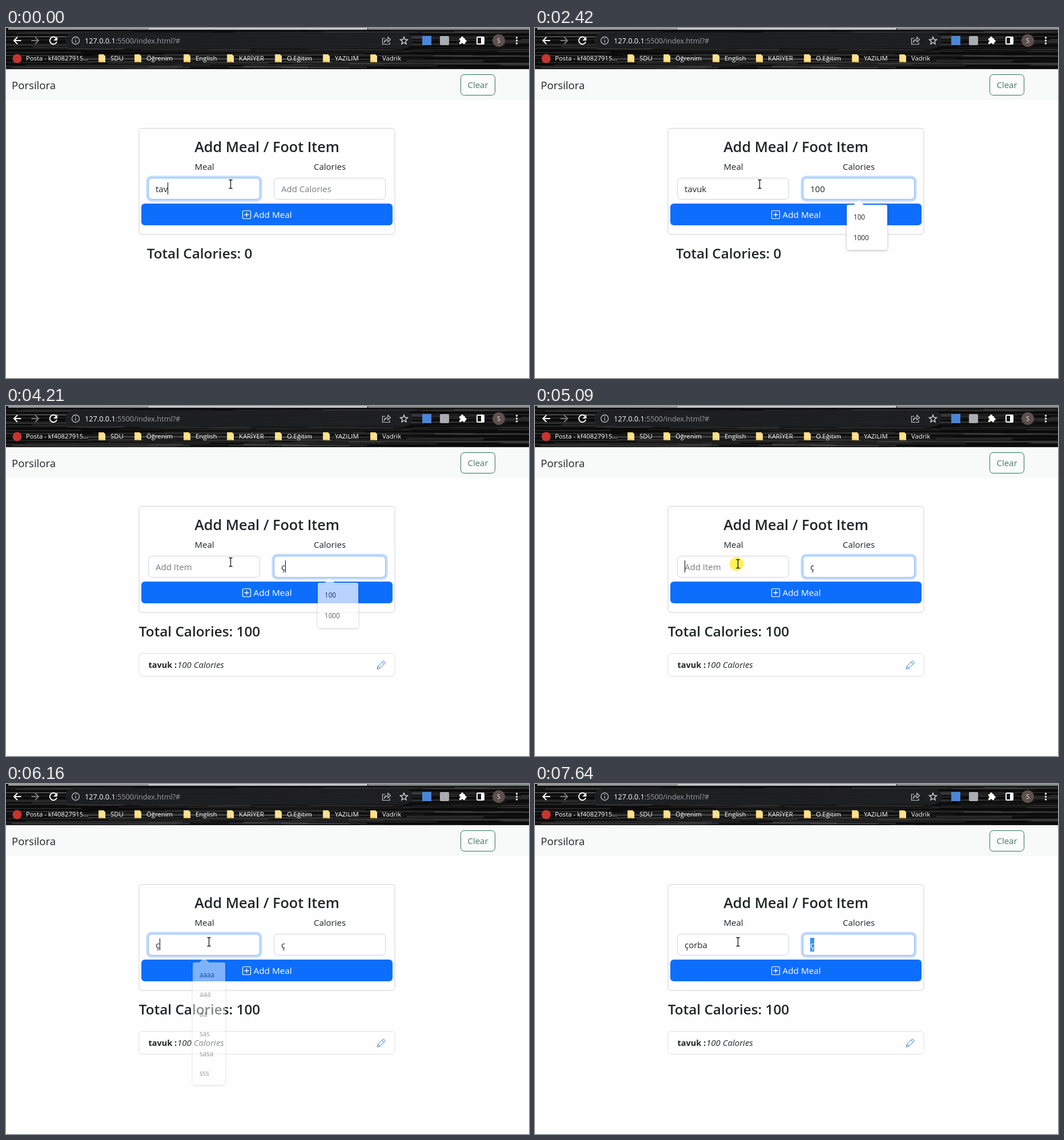
An HTML page with a canvas for the animation above (8 s loop, 916 by 612 pixels).

```html
<!DOCTYPE html>
<html lang="tr">
<head>
<meta charset="utf-8">
<title>Calorie tracker</title>
<style>
html, body { margin: 0; width: 100%; height: 100%; overflow: hidden; background: #fefefe; }
canvas { display: block; }
</style>
</head>
<body>
<canvas id="stage" width="916" height="612"></canvas>
<script>
const W = 916, H = 612, LOOP = 8000;
const SANS = '"Open Sans", "Noto Sans", sans-serif';
const BLUE = '#0d6efd', INK = '#212529', HINT = '#757b81';

function layer() {
  const el = document.createElement('canvas');
  el.width = W;
  el.height = H;
  return el.getContext('2d');
}

const screen = document.getElementById('stage').getContext('2d');
const base = layer(), overlay = layer();
let c = base;

// [start time, value] pairs; the last one that has started applies
const TRACKS = {
  meal: [[0, 'tav'], [270, 'tavu'], [540, 'tavuk'], [2490, ''], [6090, 'ç'],
    [6500, 'ço'], [6760, 'çor'], [7090, 'çorb'], [7170, 'çorba']],
  cal: [[0, ''], [1560, '1'], [1760, '10'], [1890, '100'], [2490, ''], [4080, 'ç']],
  caret: [[0, 'meal'], [740, 'cal'], [1280, ''], [1560, 'cal'], [2420, ''], [2950, 'cal'],
    [3480, ''], [4010, 'cal'], [4680, ''], [5090, 'meal'], [5690, ''], [6090, 'meal'], [7500, '']],
  focus: [[0, 0], [740, .25], [810, .75], [880, 1], [5160, .7], [5230, .25], [5300, 0],
    [7500, .25], [7570, .75], [7640, 1]],
  calMenu: [[0, 0], [1560, 1], [4150, .7], [4220, .35], [4350, 0]],
  mealMenu: [[0, 0], [6090, .75], [6160, .47], [6230, .2], [6300, 0]],
  click: [[0, false], [5090, true], [5300, false]]
};

function at(name, t) {
  let value;
  for (const [start, v] of TRACKS[name]) if (t >= start) value = v;
  return value;
}

function text(s, x, y, size, color = INK, style = '', align = 'left') {
  c.font = `${style} ${size}px ${SANS}`;
  c.fillStyle = color;
  c.textAlign = align;
  c.fillText(s, x, y);
}

function rect(x, y, w, h, fill) {
  c.fillStyle = fill;
  c.fillRect(x, y, w, h);
}

function box(x, y, w, h, r, fill, line, width = 1) {
  c.beginPath();
  c.roundRect(x, y, w, h, r);
  if (fill) { c.fillStyle = fill; c.fill(); }
  if (line) { c.strokeStyle = line; c.lineWidth = width; c.stroke(); }
}

function dot(x, y, r, fill) {
  c.beginPath();
  c.arc(x, y, r, 0, 7);
  c.fillStyle = fill;
  c.fill();
}

function stroke(d, color, width = 1) {
  c.strokeStyle = color;
  c.lineWidth = width;
  c.stroke(new Path2D(d));
}

function grain() {
  let seed = 11;
  const rnd = () => (seed = seed * 16807 % 2147483647) / 2147483647;
  c.save();
  c.beginPath();
  c.rect(0, 0, W, 72);
  c.clip();
  rect(0, 0, W, 72, '#0b0b0b');
  for (let i = 0; i < 170; i++) {
    const x = rnd() * (W + 200) - 200, y = 3 + rnd() * 70, len = 80 + rnd() * 350;
    const bend = rnd() * 3 - 1.5;
    c.beginPath();
    c.moveTo(x, y);
    c.bezierCurveTo(x + len * .3, y + bend, x + len * .6, y - bend, x + len, y + bend / 2);
    c.strokeStyle = `rgba(150,150,150,${.08 + rnd() * .26})`;
    c.lineWidth = .6 + rnd() * 1.1;
    c.stroke();
  }
  rect(4, 0, 246, 3, '#959897');
  rect(250, 0, 383, 3, '#c3c8c6');
  rect(634, 0, 282, 3, '#858887');
  c.restore();
}

function toolbar() {
  box(104, 8, 608, 28, 14, 'rgba(30,31,33,.95)');
  stroke('M26.5 22H14M20 16L14 22L20 28', '#fff', 2);
  stroke('M44.5 22H57M51 16L57 22L51 28', '#77797b', 2);
  stroke('M88 18A6.3 6.3 0 1 0 89 24', '#fff', 2);
  c.fillStyle = '#fff';
  c.fill(new Path2D('M90 15V22H83Z'));
  stroke('M115.5 22A6.5 6.5 0 1 1 128.5 22A6.5 6.5 0 1 1 115.5 22M122 21V25.5M122 18V19.6', '#b6babd', 1.4);
  text('127.0.0.1', 138, 26.5, 12.7, '#fff', '500');
  text(':5500/index.html?#', 138 + c.measureText('127.0.0.1').width, 26.5, 12.7, '#9aa0a6');
  stroke('M664 18H659.5V28.5H672V25M662.5 25Q663 19.5 669 19.5V16L673.5 20.5L669 24.5V21.5Q665 21.5 662.5 25Z', '#c4c7c9', 1.2);

  c.beginPath();
  for (let i = 0; i < 10; i++) {
    const r = i % 2 ? 3 : 6.8, a = i * Math.PI / 5 - Math.PI / 2;
    c.lineTo(697 + r * Math.cos(a), 22.5 + r * Math.sin(a));
  }
  c.closePath();
  c.strokeStyle = '#d5d7d9';
  c.lineWidth = 1.4;
  c.stroke();

  rect(729, 14, 16, 16, '#4a86d8');
  box(760, 14, 16, 16, 2, '#a9adb2');
  box(794, 18, 10, 10, 1, '#fff');
  dot(799, 17.5, 2.5, '#fff');
  dot(804, 23, 2.5, '#fff');
  dot(794, 23, 1.8, '#111');
  dot(799, 28, 1.8, '#111');
  box(825, 16, 12, 12, 1, null, '#fff', 2);
  rect(832, 16, 5, 12, '#fff');
  dot(863, 22, 11, '#5d504d');
  text('S', 863, 26, 11, '#eee', '', 'center');
  for (const y of [17, 22, 27]) dot(894.5, y, 1.7, '#fff');
}

function bookmarks() {
  dot(19.5, 53.5, 8, '#c5352f');
  text('Posta - kf40827915...', 35, 57, 11.3, '#fff', '500');
  const folders = [['SDU', 183], ['Öğrenim', 246], ['English', 332], ['KARİYER', 408],
    ['O.Eğitim', 492], ['YAZILIM', 576], ['Vadrik', 659]];
  for (const [name, x] of folders) {
    box(x - 21, 46, 10, 13, 1, '#f6d876');
    box(x - 19, 48, 10, 12, 1, '#fbe192');
    rect(x - 21, 58, 9, 2, '#e2b94f');
    text(name, x, 57, 11.3, '#fff', '500');
  }
}

function page() {
  rect(0, 0, W, H, '#fefefe');
  grain();
  toolbar();
  bookmarks();
  rect(0, 72, W, 54, '#f8faf9');
  text('Porsilora', 10, 107, 18.6);
  box(796.5, 81.5, 60, 36, 6, '#fbfcfc', '#34705f');
  text('Clear', 826.5, 105, 15, '#4a7668', '', 'center');
  box(233, 175.5, 448, 185.5, 5, '#fefefe', '#cfd2d5');
  text('Add Meal / Foot Item', 457, 217, 25.2, INK, '600', 'center');
  text('Meal', 347.5, 248, 15, INK, '', 'center');
  text('Calories', 567, 248, 15, INK, '', 'center');
  box(237, 307, 440, 38, 6, BLUE);
  box(414.5, 319.5, 14, 14, 2, null, '#fff', 1.2);
  stroke('M421.5 322.5V330.5M417.5 326.5H425.5', '#fff', 1.3);
  text('Add Meal', 433.5, 332, 15.3, '#fff');
}

function input(x, value, hint, glow, caret) {
  if (glow) {
    c.globalAlpha = glow;
    box(x - 3.5, 258.5, 203, 45, 9, '#c2dbfe');
    c.globalAlpha = 1;
  }
  box(x + .5, 262.5, 195, 37, 6, '#fff', '#ced4da');
  if (glow) {
    c.globalAlpha = glow;
    box(x + .5, 262.5, 195, 37, 6, null, '#86b7fe');
    c.globalAlpha = 1;
  }
  text(value || hint, x + 13, 287, 15, value ? INK : HINT);
  if (caret) {
    const end = value ? c.measureText(value).width : 0;
    rect(Math.round(x + 13 + end), 270, 1, 21, '#000');
  }
}

// Drawn opaque on its own layer so that its shadow fades with it
function menu(x, y, w, h, items, first, pitch, alpha) {
  if (!alpha) return;
  const tip = x + w / 2 - 8 + 7 * (w > 60);
  const tipX = w > 60 ? 567 : 347;
  c = overlay;
  c.clearRect(0, 0, W, H);
  c.shadowColor = 'rgba(0,0,0,.28)';
  c.shadowBlur = 4;
  c.shadowOffsetY = 1;
  box(x, y, w, h, 3, '#fff');
  c.shadowColor = 'transparent';
  c.fill(new Path2D(`M${tipX - 9} ${y + .5}L${tipX} ${y - 8}L${tipX + 9} ${y + .5}Z`));
  items.forEach((s, i) => text(s, x + 12, first + i * pitch, 11.7, '#222'));
  c = screen;
  c.globalAlpha = alpha;
  c.drawImage(overlay.canvas, 0, 0);
  c.globalAlpha = 1;
}

function entry() {
  box(233, 432.5, 448, 40, 6, '#fff', '#dcdfe1');
  text('tavuk :', 249.5, 458, 14.5, INK, 'bold');
  text('100 Calories', 300, 458, 15, INK, 'italic');
  stroke('M650 460L651.5 455L661 445.5L664.5 449L655 458.5ZM658.5 448L662 451.5M651.5 455L655 458.5', '#2b74d8');
}

function pointer(t) {
  const p = t < 4680 ? 0 : Math.min(1, (Math.floor((t - 4680) / 70) + 1) / 4);
  const x = Math.round(393 - 38 * p) + .5, y = Math.round(273 + 3 * p);
  if (at('click', t)) dot(353, 276, 12, 'rgba(255,238,60,.85)');
  stroke(`M${x - 3} ${y - 7.5}H${x - 1}L${x} ${y - 6.5}L${x + 1} ${y - 7.5}H${x + 3}` +
    `M${x} ${y - 6.5}V${y + 6.5}M${x - 3} ${y + 7.5}H${x - 1}L${x} ${y + 6.5}L${x + 1} ${y + 7.5}H${x + 3}`, '#111', 1.3);
}

function draw(t) {
  const focus = at('focus', t), caret = at('caret', t), added = t >= 2490;
  c.drawImage(base.canvas, 0, 0);
  input(249, at('meal', t), 'Add Item', 1 - focus, caret === 'meal');
  input(469, at('cal', t), 'Add Calories', focus, caret === 'cal');
  if (t >= 7500) {
    rect(482, 269, 7, 24, '#3390ff');
    text('ç', 482, 287, 15, '#fff');
  }
  text('Total Calories: ' + (added ? 100 : 0), 339, 403, 24.3, INK, '600', 'center');
  if (added) entry();

  const amounts = t < 1760 ? ['100', '1000', '150'] : ['100', '1000'];
  menu(546, 309, 71, 8 + 35.5 * amounts.length, amounts, 335, 35.5, at('calMenu', t));
  menu(327, 312, 57, 214, ['aaaa', 'aaa', 'aa', 'sas', 'sasa', 'sss'], 338, 34.4, at('mealMenu', t));
  pointer(t);
}

page();
c = screen;
const begin = performance.now();
function tick() {
  draw((performance.now() - begin) % LOOP);
  requestAnimationFrame(tick);
}
tick();
</script>
</body>
</html>
```
